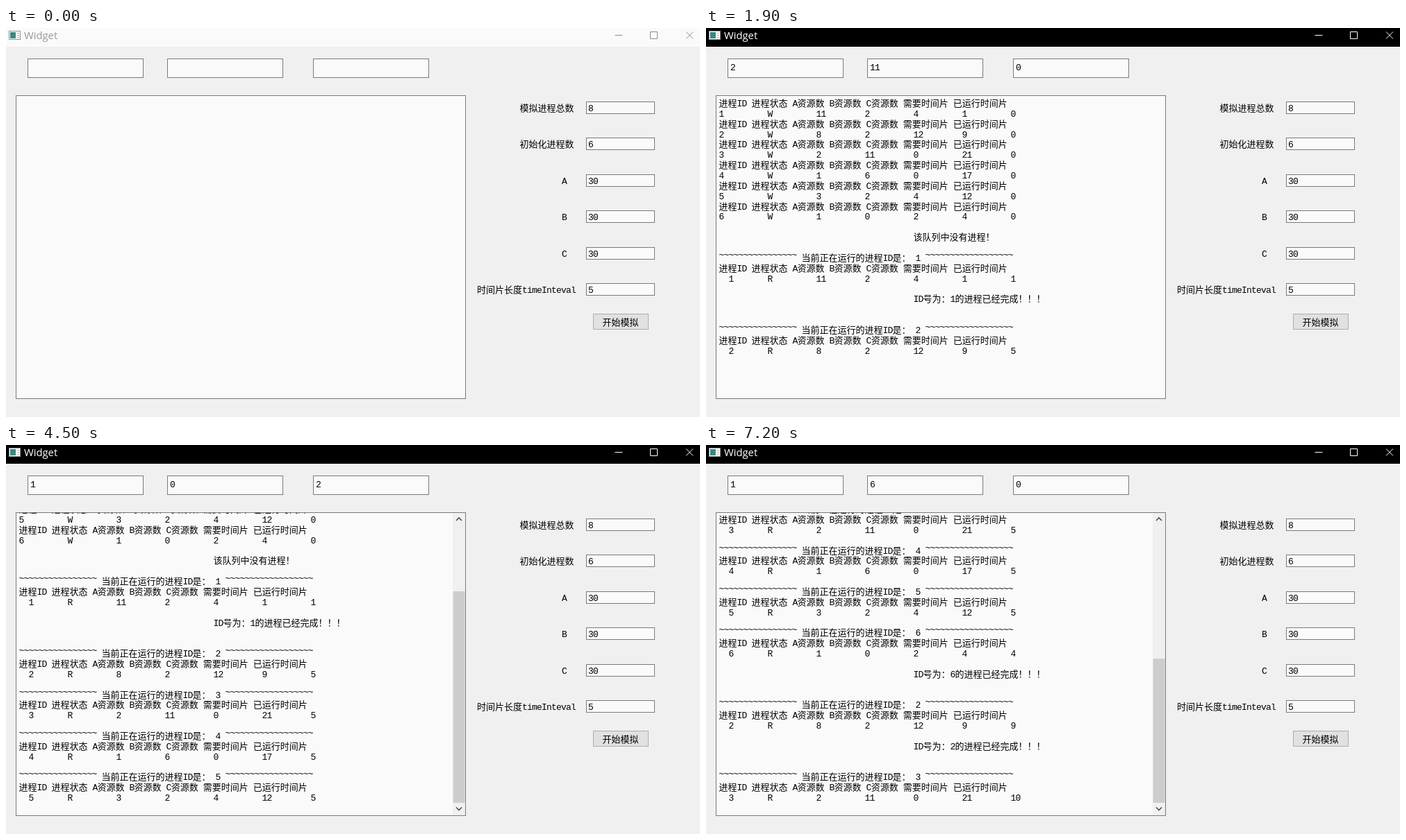
Animation, 999 px wide and 561 px high, one loop 8 s. Source, as an HTML page:

```html
<!DOCTYPE html>
<html lang="zh-CN">
<head>
<meta charset="utf-8">
<title>Widget</title>
<style>
  html, body { margin: 0; width: 100%; height: 100%; overflow: hidden; background: #f0f0f0; }
  svg { display: block; width: 999px; height: 561px; }
  text { font: 13px "Noto Sans CJK SC", "Noto Sans CJK", sans-serif; white-space: pre; fill: #000; }
  .mono { font: 13px "Liberation Mono", monospace; letter-spacing: -.8px; }
  #title { font: 14.8px "Open Sans", "Noto Sans", sans-serif; }
  .box { fill: #fafafa; stroke: #7a7a7a; }
  .line { fill: none; stroke-width: 1; }
</style>
</head>
<body>
<svg viewBox="0 0 999 561" xml:space="preserve">
  <defs>
    <clipPath id="view"><rect x="15" y="98" width="646" height="436"/></clipPath>
    <linearGradient id="teal" x2="1" y2="1">
      <stop stop-color="#3d7f9b"/><stop offset="1" stop-color="#3f8f68"/>
    </linearGradient>
  </defs>
  <rect width="999" height="561" fill="#f0f0f0"/>
  <rect id="bar" width="999" height="27"/>
  <rect x="4.500" y="4.500" width="16" height="12" fill="#fff" stroke="#8c9296"/>
  <rect x="6" y="6" width="8" height="9" fill="url(#teal)"/>
  <path d="M16 7.500h3M16 10.500h3M16 13.500h3" stroke="#a5abb0"/>
  <text id="title" x="26" y="16">Widget</text>
  <path id="controls" class="line" d="M876.500 10.500h11M927.500 5.500h10v10h-10zM979 5.500l10 10m0-10l-10 10"/>
  <g id="form"></g>
  <rect class="box" x="14.500" y="97.500" width="647" height="437"/>
  <g clip-path="url(#view)"><g id="log"></g></g>
  <g id="scroll">
    <rect x="643" y="98" width="18" height="436" fill="#f0f0f0"/>
    <rect id="thumb" x="643.500" width="17" fill="#cdcdcd"/>
    <path class="line" style="stroke:#505050;stroke-width:1.600" d="M648 109l4-4 4 4M648 522.500l4 4 4-4"/>
  </g>
  <rect id="button" x="845.500" y="412.500" width="79" height="22"/>
  <g id="caption"></g>
</svg>
<script>
const $ = id => document.getElementById(id);
const LOOP = 8000, PITCH = 14.86, PAGE = 436;

// Latin runs sit on a 7px grid, ideographs on 13px; tildes ride high.
function markup(s) {
  let raised = false;
  return s.replace(/~+|[ -}]+/g, run => {
    const up = run[0] === '~';
    const dy = up ? -5.5 : raised ? 5.5 : 0;
    raised = up;
    return `<tspan class="mono" dy="${dy}">${run}</tspan>`;
  });
}
const label = (x, y, s) => `<text x="${x}" y="${y}">${markup(s)}</text>`;
const box = (x, y, w, h, id = '') =>
  `<rect ${id && `id="${id}"`} class="box" x="${x + .5}" y="${y + .5}" width="${w}" height="${h}"/>`;

// Static form
const inputs = [
  [739.5, '模拟进程总数', 8], [739.5, '初始化进程数', 6],
  [800, 'A', 30], [800, 'B', 30], [800, 'C', 30],
  [678, '时间片长度timeInteval', 5]
];
const tops = [31, 232, 442];
$('form').innerHTML =
  tops.map((x, i) => box(x, 44, 166, 27) + `<text id="top${i}" class="mono" x="${x + 4}" y="61"></text>`).join('') +
  inputs.map(([x, name, value], i) => {
    const y = Math.round(106 + 52.4 * i);
    return label(x, y + 14, name) + box(835, y, 98, 17, 'in' + i) + label(838, y + 14, '' + value);
  }).join('');
$('caption').innerHTML = label(858.5, 429, '开始模拟');

// Process: A, B, C, needed time
const procs = [[11, 2, 4, 1], [8, 2, 12, 9], [2, 11, 0, 21], [1, 6, 0, 17], [3, 2, 4, 12], [1, 0, 2, 4]];
const header = '进程ID 进程状态 A资源数 B资源数 C资源数 需要时间片 已运行时间片';
const indent = ' '.repeat(40);
const row = (id, state, p, ran) => [id, state, ...p, ran].map(v => String(v).padEnd(10)).join('').trimEnd();

const lines = [];
procs.forEach((p, i) => lines.push(header, row(i + 1, 'W', p, 0)));
lines.push('', indent + '该队列中没有进程！', '');

// Start time, process, time used, process shown on top
const runs = [
  [700, 1, 1, 2], [1700, 2, 5, 3], [2700, 3, 5, 4], [3600, 4, 5, 5],
  [4500, 5, 5, 6], [5400, 6, 4, 2], [6300, 2, 9, 3], [7200, 3, 10, 4]
];
// Start time, visible lines, values of the top fields
const steps = [[0, 0, ['', '', '']]];
for (const [start, id, ran, next] of runs) {
  const p = procs[id - 1];
  lines.push(`${'~'.repeat(16)} 当前正在运行的进程ID是： ${id} ${'~'.repeat(18)}`,
    header, row('  ' + id, 'R', p, ran), '');
  if (ran === p[3]) lines.push(`${indent}ID号为：${id}的进程已经完成！！！`, '', '');
  steps.push([start, lines.length, procs[next - 1].slice(0, 3)]);
}

const buttonLook = [
  [0, '#e1e1e1', '#adadad'], [500, '#e5f1fb', '#0078d7'], [600, '#cce4f7', '#005499'],
  [700, '#d3e8f8', '#0064b4'], [800, '#dcecf9', '#0078d7'], [1000, '#e5f1fb', '#0078d7'],
  [1200, '#e3e9ee', '#6c98bd'], [1300, '#e1e1e1', '#adadad']
];
const fieldLook = [
  [0, '#7a7a7a'], [1200, '#5a5a5a'], [1300, '#303030'], [1500, '#171717'], [1700, '#444'], [1900, '#7a7a7a']
];
const pick = (table, t) => table.findLast(entry => entry[0] <= t);

function paint(el, fill, stroke) {
  el.style.fill = fill;
  el.style.stroke = stroke;
}

let shown;
function showStep(step) {
  if (step === shown) return;
  shown = step;
  const [, count, top] = step;
  const offset = Math.max(0, 108 + PITCH * (count - 1) - 523);
  $('log').innerHTML = lines.slice(0, count)
    .map((s, i) => s && label(18.5, Math.round(113 + PITCH * i - offset), s)).join('');
  top.forEach((v, i) => $('top' + i).textContent = v);
  $('scroll').style.display = offset ? '' : 'none';
  const size = Math.round(401 * PAGE / (PITCH * count + 8));
  $('thumb').setAttribute('y', 516 - size);
  $('thumb').setAttribute('height', size);
}

function frame(now) {
  const t = Math.max(0, now) % LOOP;
  const active = t >= 600;
  $('bar').style.fill = active ? '#000' : '#fafafa';
  $('title').style.fill = active ? '#fff' : '#999';
  $('controls').style.stroke = active ? '#fff' : '#8c8c8c';
  const [, fill, edge] = pick(buttonLook, t);
  paint($('button'), fill, edge);
  paint($('in5'), '#fafafa', pick(fieldLook, t)[1]);
  showStep(pick(steps, t));
}

const start = performance.now();
function tick() {
  frame(performance.now() - start);
  requestAnimationFrame(tick);
}
tick();
</script>
</body>
</html>
```
